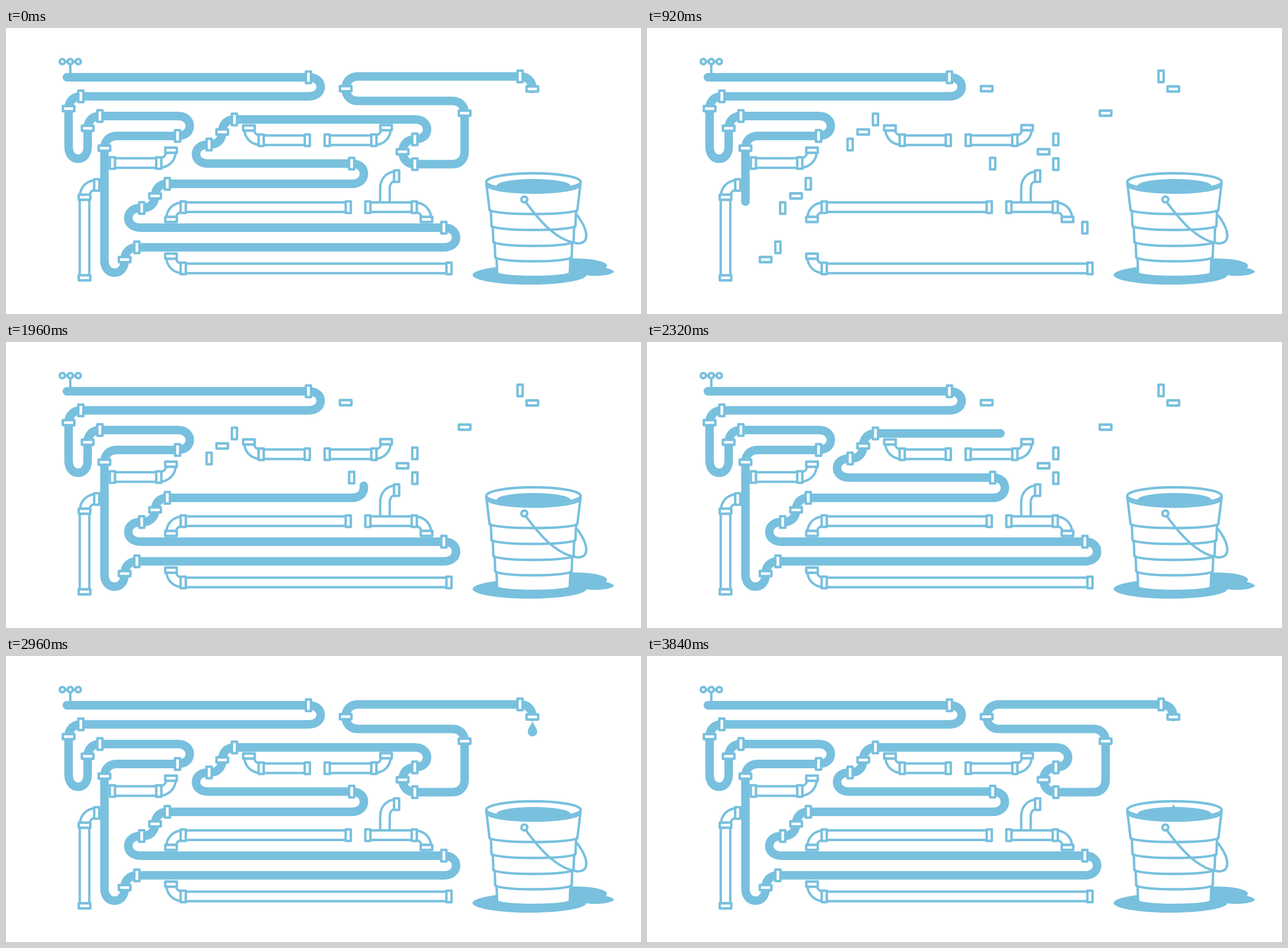
An HTML page that plays this animation: 1116x502 px, repeating every 3880 ms.

```html
<!DOCTYPE html>
<html lang="en">
<head>
<meta charset="utf-8">
<title>Pipes and bucket</title>
<style>
  html, body { margin: 0; width: 100%; height: 100%; overflow: hidden; background: #fff; }
  svg { display: block; width: 100%; height: 100%; --blue: #78c0de; }
  .line { fill: #fff; stroke: var(--blue); stroke-width: 4.3; stroke-linejoin: round; stroke-linecap: round; }
  .open { fill: none; }
  .solid { fill: var(--blue); }
  .wall { fill: none; stroke: var(--blue); stroke-width: 21; }
  .bore { fill: none; stroke: #fff; stroke-width: 12.6; }
  #water { fill: none; stroke: var(--blue); stroke-width: 15; stroke-linecap: round; }
</style>
</head>
<body>
<svg viewBox="0 0 1116 502">
  <defs>
    <clipPath id="mouth"><ellipse cx="927" cy="270" rx="83" ry="15"/></clipPath>
    <clipPath id="air"><rect width="1116" height="275"/></clipPath>
    <path id="drop" class="solid" d="M0 0C3 7 8.3 12 8.3 18A8.3 8.3 0 0 1 -8.3 18C-8.3 12 -3 7 0 0"/>
  </defs>

  <!-- tap -->
  <g class="line">
    <path d="M99 59H127M113 59V84"/>
    <circle cx="99" cy="59" r="4.6"/><circle cx="113" cy="59" r="4.6"/><circle cx="127" cy="59" r="4.6"/>
  </g>

  <g id="pipes"></g>
  <path id="water"/>

  <!-- puddle -->
  <ellipse class="solid" cx="920" cy="433.5" rx="100" ry="17"/>
  <path class="solid" d="M985 405C1020 403 1052 408 1056 416Q1056 420 1054 421Q1066 424 1069 428C1062 435 1035 437 1015 433L980 430Z"/>

  <!-- bucket -->
  <g class="line">
    <path id="body"/>
    <path id="bands" class="open"/>
    <ellipse cx="927" cy="270" rx="83" ry="15"/>
  </g>
  <ellipse class="solid" cx="927" cy="277" rx="65" ry="12" clip-path="url(#mouth)"/>
  <circle class="line" cx="911" cy="301" r="5.2"/>
  <path class="line open" d="M913 305C936 336 966 373 1004 378C1027 379 1023 354 1004 329"/>

  <g id="drops" clip-path="url(#air)"></g>
  <g id="joints" class="line"></g>
</svg>
<script>
const LOOP = 3880, STEP = 40, START = 40, FILL = 2840;
const DROPS = [2880, 3120, 3360], FALL = 520, SPEED = 0.3625;
const ARM = 21.5; // reach of an elbow
const $ = id => document.getElementById(id);

// A route is a start point and H/V legs. Letters after a leg put joints on it:
// a start, s an elbow after the start, m middle, e an elbow before the end, z end.
const WATER = `107 86.5 H553e V120 H110e V229.5s H143.5 V154.5e H323s V189.5 H173s V429.5s
  H208.5 V385e H791s V350.5 H215s V316 H262m V273.5m H629s V238 H334s V204.5 H380m V160.5m
  H740s V195.5 H697s V239m H806s V128e H597 V85m H925e V107z`;
const PIPES = [
  '427 175 V197e H529.5sz', '564.5 197 H668ae V175z', '187 237 H290ae V214.5z',
  '159 275.5 H138e V438.5sz', '290 336 V314.5e H601.5sz', '666 308 V260 H686.5z',
  '636 314.5 H739ae V336z', '290 400.5 V422e H778.5sz'
];

function joint(x, y, flat) {
  const w = flat ? 20.3 : 9, h = flat ? 9 : 20.3;
  $('joints').innerHTML += `<rect x="${x - w / 2}" y="${y - h / 2}" width="${w}" height="${h}"/>`;
}

// Places the joints of a route and returns its path with rounded corners.
function lay(route) {
  const [x0, y0, ...legs] = route.split(/\s+/);
  const points = [[+x0, +y0]];
  for (const leg of legs) {
    const [x, y] = points.at(-1), down = leg[0] === 'V', to = parseFloat(leg.slice(1));
    const way = to - (down ? y : x), len = Math.abs(way);
    const spots = { a: 0, s: ARM, m: len / 2, e: len - ARM, z: len };
    for (const flag of leg.match(/[a-z]*$/)[0]) {
      const go = Math.sign(way) * spots[flag];
      joint(x + (down ? 0 : go), y + (down ? go : 0), down);
    }
    points.push(down ? [x, to] : [to, y]);
  }
  const last = points.length - 1;
  // point on the leg from corner i towards its neighbour j
  const toward = (i, j, part) => {
    const [x, y] = points[i], dx = points[j][0] - x, dy = points[j][1] - y;
    const len = Math.hypot(dx, dy), room = j === 0 || j === last ? len : len / 2;
    const k = Math.min(ARM, room) * part / len;
    return `${x + dx * k} ${y + dy * k}`;
  };
  let d = `M${points[0]}`;
  for (let i = 1; i < last; i++) {
    d += `L${toward(i, i - 1, 1)}C${toward(i, i - 1, 0.4)} ${toward(i, i + 1, 0.4)} ${toward(i, i + 1, 1)}`;
  }
  return d + `L${points[last]}`;
}

$('water').setAttribute('d', lay(WATER));
$('water').setAttribute('pathLength', FILL);
$('pipes').innerHTML = PIPES.map(lay).map(d =>
  `<path class="wall" d="${d}"/><path class="bore" d="${d}"/>`).join('');

// bucket: tapering sides with a notch under each band
const half = y => 82.5 - (y - 275) * 0.12;
const sag = (y, depth) => `M${927 - half(y)} ${y}A${half(y)} ${depth} 0 0 0 ${927 + half(y)} ${y}`;
const bands = [319, 347, 375, 402];
const side = [[half(271), 271], ...bands.flatMap(y => [[half(y), y], [half(y) - 2.5, y + 4]]), [half(430), 430]];
const left = side.map(([w, y]) => [927 - w, y]).reverse();
const right = side.map(([w, y]) => [927 + w, y]);
$('body').setAttribute('d', `${sag(430, 7)}L${[...right.reverse(), ...left.reverse()].join('L')}Z`);
$('bands').setAttribute('d', sag(275, 14) + bands.map(y => sag(y, 7.5)).join(''));

$('drops').innerHTML = DROPS.map(() => '<use href="#drop"/>').join('');
const drops = [...$('drops').children];

function draw(now) {
  const t = Math.floor(now % LOOP / STEP) * STEP;
  const filled = t < START ? FILL : Math.min(t - START, FILL);
  $('water').style.visibility = filled ? 'visible' : 'hidden';
  $('water').setAttribute('stroke-dasharray', filled < FILL ? `${filled} ${2 * FILL}` : 'none');
  drops.forEach((drop, i) => {
    const age = t - DROPS[i];
    drop.style.visibility = age >= 0 && age < FALL ? 'visible' : 'hidden';
    drop.setAttribute('transform', `translate(925.3 ${86 + age * SPEED})`);
  });
}

const begin = performance.now();
function tick() {
  draw(performance.now() - begin);
  requestAnimationFrame(tick);
}
tick();
</script>
</body>
</html>
```
